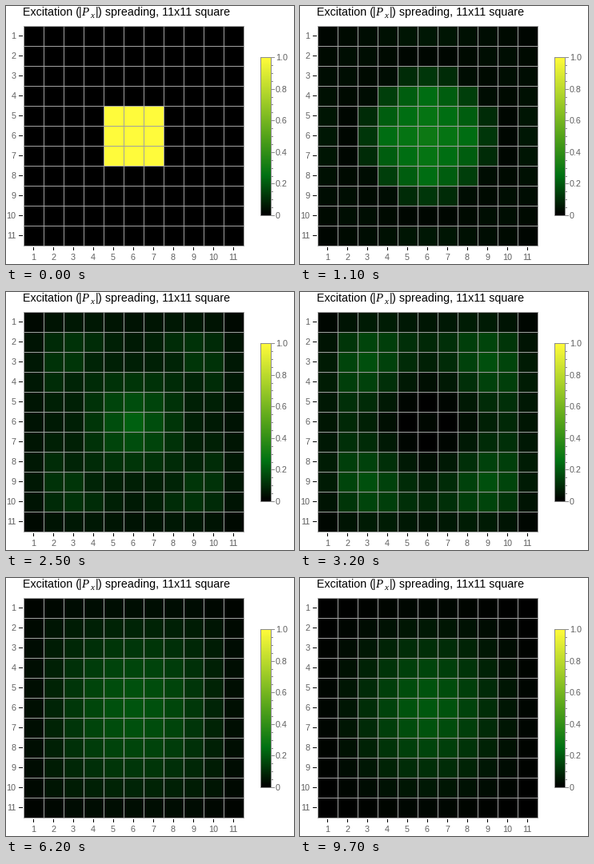
Recreate the animation shown at these times as a matplotlib script. Size 360 by 323 pixels, loop 10000 ms.

```python
import numpy as np
import matplotlib.pyplot as plt
from matplotlib.animation import FuncAnimation
from matplotlib.colors import LinearSegmentedColormap

W, H, DPI = 360, 323, 100
N, CELL = 11, 25
LEFT, TOP = 22.5, 25.5
RIGHT, BOTTOM = LEFT + N * CELL, TOP + N * CELL
FRAMES, INTERVAL = 100, 100
PX = 72 / DPI
SANS, SERIF = "Liberation Sans", "Liberation Serif"
LABEL, MESH, BAR_EDGE = "#606060", "#a0a0a0", "#8c8c8c"
TITLE_SIZE, LABEL_SIZE = 14.3, 10.7

stops = [(0, 0, 0), (0, 113, 19), (84, 163, 26), (170, 210, 42), (255, 251, 59)]
avocado = LinearSegmentedColormap.from_list("avocado", np.array(stops) / 255, N=512)

# Lattice offsets from the central site
u, v = np.meshgrid(np.arange(N) - N // 2, np.arange(N) - N // 2)
r2 = u**2 + v**2
r = np.sqrt(r2)


def plateau(drop, power):
    """Flat-topped envelope that falls towards the edges."""
    return (1 - drop * np.abs(u / 5) ** power) * (1 - drop * np.abs(v / 5) ** power)


def hump(px, py):
    return np.cos(np.pi * u / 12) ** px * np.cos(np.pi * v / 12) ** py


def start_block():
    return (np.maximum(abs(u), abs(v)) <= 1).astype(float)


def outgoing_ring():
    ring = np.interp(r, [0, 1.4, 2, 2.3, 3, 3.6, 4.1],
                     [0.17, 0.185, 0.26, 0.22, 0.165, 0.05, 0.005])
    edge = np.maximum(abs(u), abs(v)) == 5
    return ring + 0.06 * edge * np.exp(-np.minimum(abs(u), abs(v)) ** 2 / 5)


def refocus():
    return np.abs(0.57 * np.exp(-r2 / 7.8) - 0.12 * plateau(0.5, 4))


def hollow():
    hole = 0.26 * np.exp(-r2 / 14 - (r / 4.7) ** 6)
    corners = 0.05 * (np.sin(np.pi * u / 6) * np.sin(np.pi * v / 6)) ** 2
    return np.abs(0.24 * plateau(0.75, 3) - hole + corners)


# Turning points of the motion: time in seconds and field there
times = [0, 0.6, 1.7, 3.2, 4.8, 7.5, 9.75]
fields = [start_block(), outgoing_ring(), refocus(), hollow(),
          0.168 * plateau(0.65, 4), 0.205 * hump(2.2, 2.3), 0.195 * hump(1.9, 1.8)]


def field_at(t):
    if t >= times[-1]:
        return fields[-1]
    i = np.searchsorted(times, t, side="right") - 1
    p = (t - times[i]) / (times[i + 1] - times[i])
    p = 1 - (1 - p) ** 1.5 if i == 0 else p * p * (3 - 2 * p)
    return fields[i] + (fields[i + 1] - fields[i]) * p


fig = plt.figure(figsize=(W / DPI, H / DPI), dpi=DPI, facecolor="white")
ax = fig.add_axes([0, 0, 1, 1])
ax.axis("off")


def line(x, y, color):
    # Coordinates already sit on pixel centres, so snapping would shift them
    ax.plot(x, y, color=color, lw=PX, zorder=3, snap=False,
            solid_capstyle="butt", solid_joinstyle="miter")


def text(x, y, s, size=LABEL_SIZE, color=LABEL, font=SANS, ha="left", style="normal"):
    ax.text(x, y, s, fontsize=size * PX, color=color, family=font,
            ha=ha, va="baseline", style=style)


# Title, with the symbol in italic serif
text(21, 12, "Excitation (", TITLE_SIZE, "black")
text(90.5, 12, "|", TITLE_SIZE, "black")
text(94.5, 12, "P", 15, "black", SERIF, style="italic")
text(105, 15, "x", 11, "black", SERIF, style="italic")
text(111.5, 12, "|", TITLE_SIZE, "black")
text(115, 12, ") spreading, 11x11 square", TITLE_SIZE, "black")

# Lattice
grid = ax.imshow(fields[0], cmap=avocado, vmin=0, vmax=1, interpolation="nearest",
                 extent=(LEFT, RIGHT, BOTTOM, TOP), aspect="auto", zorder=1)
for k in range(N + 1):
    x, y = LEFT + k * CELL, TOP + k * CELL
    line([x, x], [TOP - 0.5, BOTTOM + 0.5], MESH)
    line([LEFT - 0.5, RIGHT + 0.5], [y, y], MESH)
for k in range(N):
    x, y = LEFT + k * CELL + 12, TOP + k * CELL + 12
    line([x, x], [BOTTOM + 1.5, BOTTOM + 5.5], "black")
    line([LEFT - 6.5, LEFT - 1.5], [y, y], "black")
    text(x - 0.5, 318, str(k + 1), ha="center")
    text(12.5, y + 3.5, str(k + 1), ha="right")

# Colour bar
BAR_L, BAR_R, BAR_T, BAR_B = 318.5, 331.5, 64.5, 262.5
ax.imshow(np.linspace(1, 0, 200)[:, None], cmap=avocado, vmin=0, vmax=1,
          extent=(BAR_L, BAR_R, BAR_B, BAR_T), aspect="auto", zorder=1)
line([BAR_L, BAR_R, BAR_R, BAR_L, BAR_L], [BAR_T, BAR_T, BAR_B, BAR_B, BAR_T], BAR_EDGE)
for k in range(21):
    y = np.floor(BAR_B + (BAR_T - BAR_B) * k / 20) + 0.5
    major = k % 4 == 0
    line([BAR_R, BAR_R + (4.5 if major else 2.5)], [y, y], BAR_EDGE)
    if major:
        text(337, y + 3.5, f"{k / 20:.1f}" if k else "0")

ax.set_xlim(0, W)
ax.set_ylim(H, 0)


def update(i):
    grid.set_data(field_at(i * INTERVAL / 1000))
    return [grid]


anim = FuncAnimation(fig, update, frames=FRAMES, interval=INTERVAL,
                     repeat=True, repeat_delay=0, blit=False)
plt.show()
```
